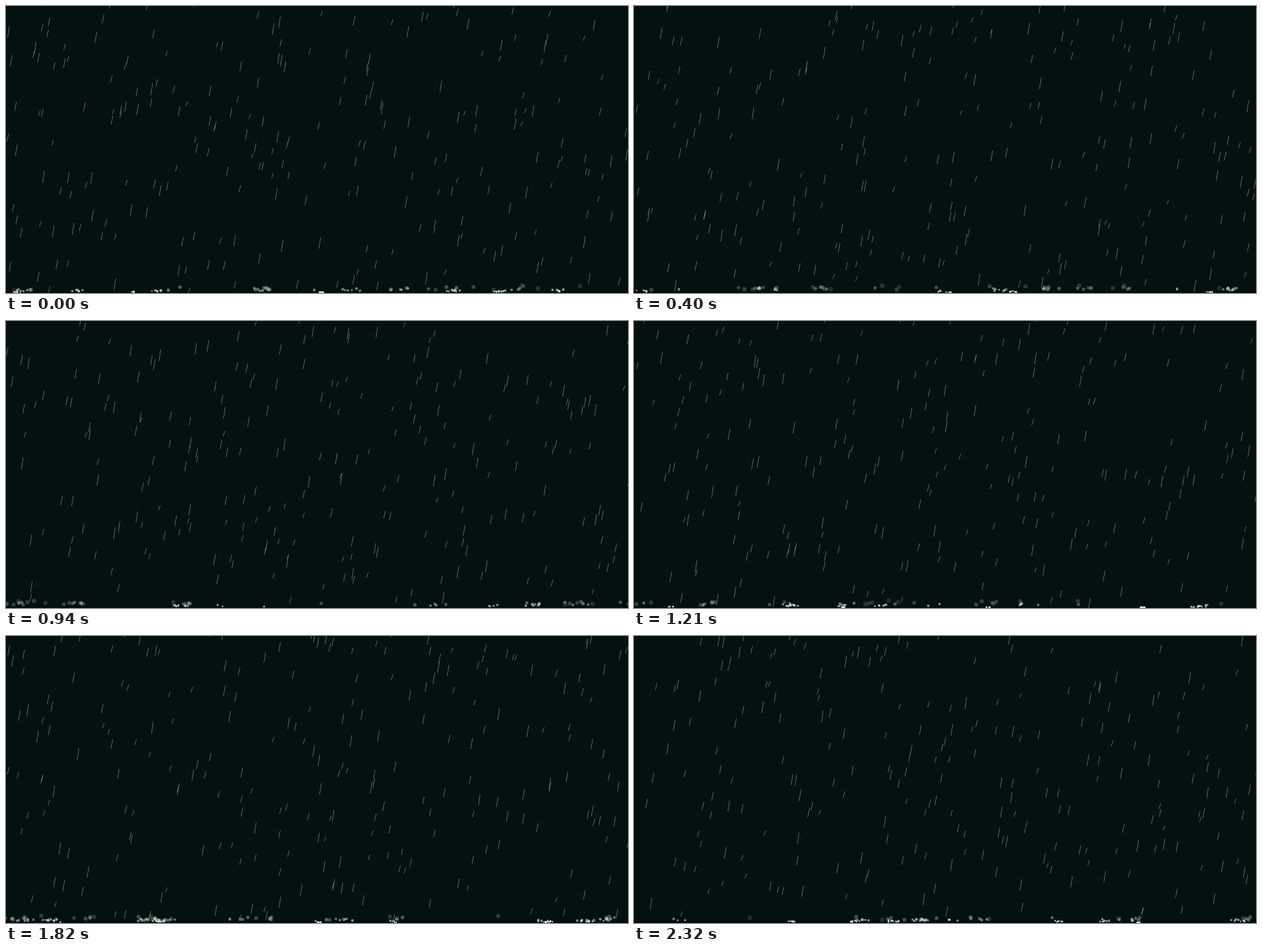
These frames come from a looping animation (1101 by 509 pixels, 2.4 s). An HTML page with a canvas:

```html
<!DOCTYPE html>
<html lang="en">
<head>
<meta charset="utf-8">
<title>Rain</title>
<style>
html, body { margin: 0; width: 100%; height: 100%; overflow: hidden; background: #051111; }
canvas { display: block; }
</style>
</head>
<body>
<canvas id="stage" width="1101" height="509"></canvas>
<script>
const W = 1101, H = 509, LOOP = 2400;
const DROPS = 236;
const WIND = 0.195;  // sideways drift, px per ms
const LEAN = 3.2;    // sideways extent of a streak, px
const ctx = document.getElementById('stage').getContext('2d');

// The picture advances at these moments (ms).
const STEPS = [
  0, 60, 145, 230, 315, 400, 510, 550,
  640, 715, 790, 865, 940,
  1080, 1145, 1210, 1270, 1343, 1417, 1490, 1570,
  1660, 1740, 1820, 1910, 1983, 2057, 2130,
  2240, 2320
];

// Repeatable random number in 0..1 for up to three integers.
function rnd(a, b = 0, c = 0) {
  let n = Math.imul(a + 1, 374761393) ^ Math.imul(b + 7, 668265263) ^ Math.imul(c + 3, 1274126177);
  n = Math.imul(n ^ (n >>> 13), 1103515245);
  n = Math.imul(n ^ (n >>> 16), 2246822519);
  return ((n ^ (n >>> 15)) >>> 0) / 4294967296;
}

const wrap = (x) => ((x % W) + W) % W;

// Streak length and falling speed are independent.
const drops = Array.from({ length: DROPS }, (_, id) => ({
  id,
  len: 8.5 + 12.5 * rnd(id, 1, 50),
  fall: H / (0.4 + 0.36 * rnd(id, 3, 50)),
  phase: 2 + rnd(id, 2, 50)
}));

const dropX = (d, cycle, time) => wrap(rnd(d.id, cycle) * W - WIND * time);

function drawDrop(d, cycle, time) {
  const x = dropX(d, cycle, time);
  const y = time / d.fall * H;
  ctx.beginPath();
  ctx.moveTo(x + LEAN, y - d.len);
  ctx.lineTo(x, y);
  ctx.stroke();
}

function drawSplash(d, cycle, since) {
  const count = Math.floor(rnd(d.id, cycle, 9) * 14) - 4;
  const x = dropX(d, cycle, d.fall);
  for (let j = 0; j < count; j++) {
    const r = (n) => rnd(d.id, cycle, 20 + j * 5 + n);
    const age = since / (65 + 75 * r(0));
    if (age >= 1) continue;
    const px = x + (r(1) - 0.5) * (8 + 48 * age);
    const py = H - 1 - (5 + 8 * r(2)) * age;
    ctx.fillStyle = `rgba(232,240,236,${0.12 + 0.82 * (1 - age)})`;
    ctx.beginPath();
    ctx.arc(px, py, 1 + 0.6 * r(3) + 2.7 * age ** 1.6, 0, Math.PI * 2);
    ctx.fill();
  }
}

function draw(t) {
  ctx.fillStyle = '#051111';
  ctx.fillRect(0, 0, W, H);
  ctx.fillStyle = 'rgba(0,0,0,.2)';
  ctx.fillRect(0, H - 4, W, 4);

  ctx.strokeStyle = 'rgba(226,238,234,.45)';
  ctx.lineWidth = 1;
  for (const d of drops) {
    const turn = t / d.fall + d.phase;
    const cycle = Math.floor(turn);
    const time = (turn - cycle) * d.fall;
    drawDrop(d, cycle, time);
    drawSplash(d, cycle - 1, time);
  }
}

const start = performance.now();
let shown = -1;

function frame() {
  const t = (performance.now() - start) % LOOP;
  const step = STEPS.findLast((s) => s <= t);
  if (step !== shown) draw(shown = step);
  requestAnimationFrame(frame);
}
frame();
</script>
</body>
</html>
```
